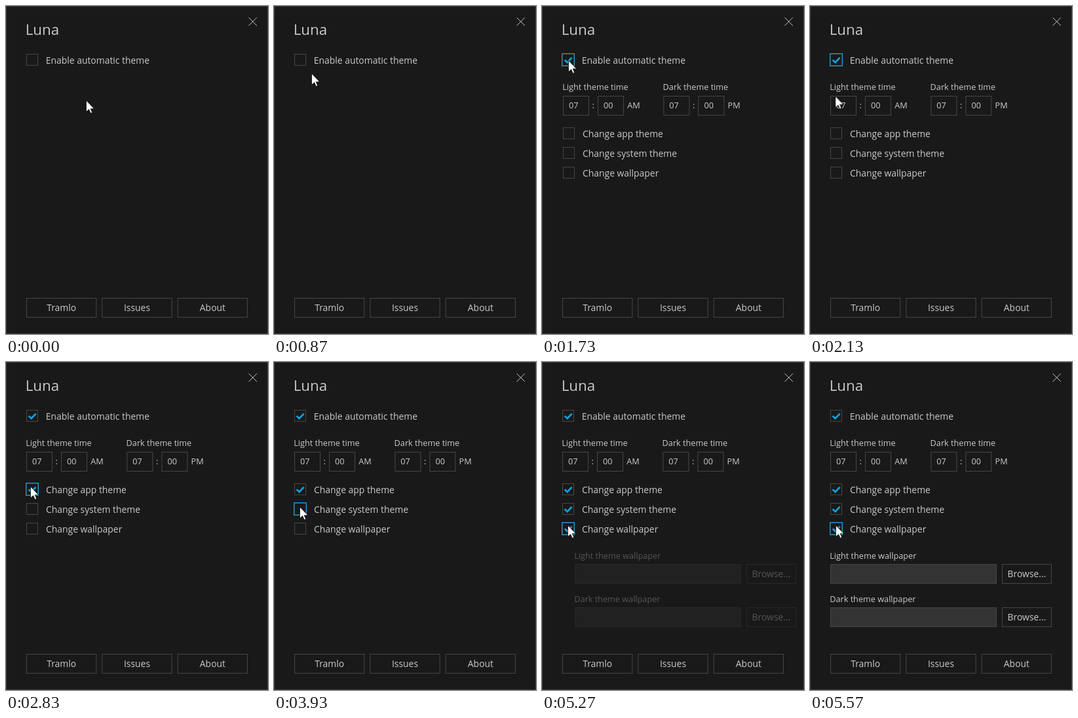
An HTML page for the animation above (6010 ms loop, 400 by 500 pixels).

```html
<!DOCTYPE html>
<html lang="en">
<head>
<meta charset="utf-8">
<title>Luna settings</title>
<style>
html, body { margin: 0; width: 100%; height: 100%; overflow: hidden; background: #191919; }
svg { display: block; width: 400px; height: 500px; font: 13.9px "Open Sans", "Noto Sans", sans-serif; }
text { fill: #cacaca; }
rect { fill: none; stroke: #464646; }
.title { font-size: 22.3px; }
.small text { font-size: 12.7px; }
.mid { text-anchor: middle; }
.field { fill: #333; }
.close { stroke: #c4c4c4; }
.ring { stroke: #119eda; }
.tick { fill: none; stroke: #119eda; stroke-width: 2.8; }
.cursor { fill: #fff; stroke: #000; stroke-width: .7; }

/* Every part shares one 6010 ms clock. */
.cursor, .box, .ring, .tick, .panel { animation: 6010ms linear infinite both; }
.box, .ring, .tick { animation-timing-function: step-end; }
.cursor { animation-name: move; }
.times { animation-name: slide-times, fade-times; }
.papers { animation-name: slide-papers, fade-papers; }
.auto .box { animation-name: hover-auto; }
.app .box { animation-name: hover-app; }
.system .box { animation-name: hover-system; }
.paper .box { animation-name: hover-paper; }
.auto .ring { animation-name: focus-auto; }
.app .ring { animation-name: focus-app; }
.system .ring { animation-name: focus-system; }
.paper .ring { animation-name: focus-paper; }
.auto .tick { animation-name: tick-auto; }
.app .tick { animation-name: tick-app; }
.system .tick { animation-name: tick-system; }
.paper .tick { animation-name: tick-paper; }

@keyframes move {
  0%, .5% { transform: translate(123px, 145px); }
  10.48% { transform: translate(110px, 142px); }
  14.48% { transform: translate(58px, 104px); }
  20.47%, 26.12% { transform: translate(43px, 81px); }
  28.79% { transform: translate(41px, 84px); }
  31.6% { transform: translate(40px, 108px); }
  42.1%, 48.25% { transform: translate(38px, 191px); }
  53.24% { transform: translate(40px, 219px); }
  55.4%, 71.05% { transform: translate(40px, 222px); }
  75.37%, 79.3% { transform: translate(40px, 249px); }
  79.36%, 100% { transform: translate(40px, 250px); }
}
@keyframes slide-times {
  0%, 23.21% { transform: translate(24px); animation-timing-function: steps(24); }
  28.95%, 100% { transform: none; }
}
@keyframes fade-times {
  0%, 23.21% { opacity: 0; animation-timing-function: ease-out; }
  28.95%, 100% { opacity: 1; }
}
@keyframes slide-papers {
  0%, 86.44% { transform: translate(24px); animation-timing-function: steps(24); }
  92.18%, 100% { transform: none; }
}
@keyframes fade-papers {
  0%, 86.44% { opacity: 0; animation-timing-function: ease-out; }
  92.18%, 100% { opacity: 1; }
}

@keyframes hover-auto { 19.1% { stroke: #808080; } 21.63%, 100% { stroke: #464646; } 0% { stroke: #464646; } }
@keyframes hover-app { 0% { stroke: #464646; } 41.3% { stroke: #808080; } 43.76%, 100% { stroke: #464646; } }
@keyframes hover-system { 0% { stroke: #464646; } 52.5% { stroke: #808080; } 65.39%, 100% { stroke: #464646; } }
@keyframes hover-paper { 0% { stroke: #464646; } 74.7% { stroke: #808080; } 84.36%, 100% { stroke: #464646; } }

@keyframes focus-auto { 0% { opacity: 0; } 21.63% { opacity: 1; } 43.76%, 100% { opacity: 0; } }
@keyframes focus-app { 0% { opacity: 0; } 43.76% { opacity: 1; } 65.39%, 100% { opacity: 0; } }
@keyframes focus-system { 0% { opacity: 0; } 65.39% { opacity: 1; } 84.36%, 100% { opacity: 0; } }
@keyframes focus-paper { 0% { opacity: 0; } 84.36%, 100% { opacity: 1; } }

@keyframes tick-auto { 0% { opacity: 0; } 22.8%, 100% { opacity: 1; } }
@keyframes tick-app { 0% { opacity: 0; } 44.93%, 100% { opacity: 1; } }
@keyframes tick-system { 0% { opacity: 0; } 67.05%, 100% { opacity: 1; } }
@keyframes tick-paper { 0% { opacity: 0; } 86.02%, 100% { opacity: 1; } }
</style>
</head>
<body>
<svg viewBox="0 0 400 500">
  <rect x=".5" y=".5" width="399" height="499" style="stroke:#3c3c3c"/>
  <text class="title" x="29.8" y="44">Luna</text>
  <path class="close" d="M370.5 17.5l12.5 12.5M383 17.5l-12.5 12.5"/>

  <g class="auto" transform="translate(31 73)">
    <rect class="box" x=".5" y=".5" width="17" height="17"/>
    <rect class="ring" x="-.5" y="-.5" width="19" height="19"/>
    <path class="tick" d="M3.6 9.2l4 3.8 7-7.2"/>
    <text x="29.8" y="15">Enable automatic theme</text>
  </g>

  <g class="panel times">
    <g class="small">
      <g>
        <text x="30.2" y="128">Light theme time</text>
        <rect x="31.5" y="137.5" width="39" height="29"/>
        <rect x="84.5" y="137.5" width="39" height="29"/>
        <text x="39.9" y="156">07</text>
        <text x="75.6" y="156">:</text>
        <text x="93" y="156">00</text>
        <text x="129.2" y="156">AM</text>
      </g>
      <g transform="translate(153.4)">
        <text x="30.2" y="128">Dark theme time</text>
        <rect x="31.5" y="137.5" width="39" height="29"/>
        <rect x="84.5" y="137.5" width="39" height="29"/>
        <text x="39.9" y="156">07</text>
        <text x="75.6" y="156">:</text>
        <text x="93" y="156">00</text>
        <text x="129.2" y="156">PM</text>
      </g>
    </g>
    <g class="app" transform="translate(31 185)">
      <rect class="box" x=".5" y=".5" width="17" height="17"/>
      <rect class="ring" x="-.5" y="-.5" width="19" height="19"/>
      <path class="tick" d="M3.6 9.2l4 3.8 7-7.2"/>
      <text x="30" y="15">Change app theme</text>
    </g>
    <g class="system" transform="translate(31 215)">
      <rect class="box" x=".5" y=".5" width="17" height="17"/>
      <rect class="ring" x="-.5" y="-.5" width="19" height="19"/>
      <path class="tick" d="M3.6 9.2l4 3.8 7-7.2"/>
      <text x="30" y="15">Change system theme</text>
    </g>
    <g class="paper" transform="translate(31 245)">
      <rect class="box" x=".5" y=".5" width="17" height="17"/>
      <rect class="ring" x="-.5" y="-.5" width="19" height="19"/>
      <path class="tick" d="M3.6 9.2l4 3.8 7-7.2"/>
      <text x="30" y="15">Change wallpaper</text>
    </g>
  </g>

  <g class="panel papers">
    <g class="small">
      <text x="30.2" y="300">Light theme wallpaper</text>
      <text x="30.2" y="366">Dark theme wallpaper</text>
    </g>
    <rect class="field" x="31.5" y="308.5" width="253" height="29"/>
    <rect x="293.5" y="308.5" width="75" height="29"/>
    <text class="mid" x="331" y="328">Browse...</text>
    <rect class="field" x="31.5" y="374.5" width="253" height="29"/>
    <rect x="293.5" y="374.5" width="75" height="29"/>
    <text class="mid" x="331" y="394">Browse...</text>
  </g>

  <g class="mid">
    <rect x="31.5" y="445.5" width="106.33" height="29"/>
    <rect x="146.83" y="445.5" width="106.33" height="29"/>
    <rect x="262.17" y="445.5" width="106.33" height="29"/>
    <text x="84.7" y="465">Tramlo</text>
    <text x="200" y="465">Issues</text>
    <text x="315.4" y="465">About</text>
  </g>

  <path class="cursor" d="M-.5-1V16.2L3.6 12.6 6.2 18.4 8.7 17.4 6.2 11.7H11.8Z"/>
</svg>
</body>
</html>
```
